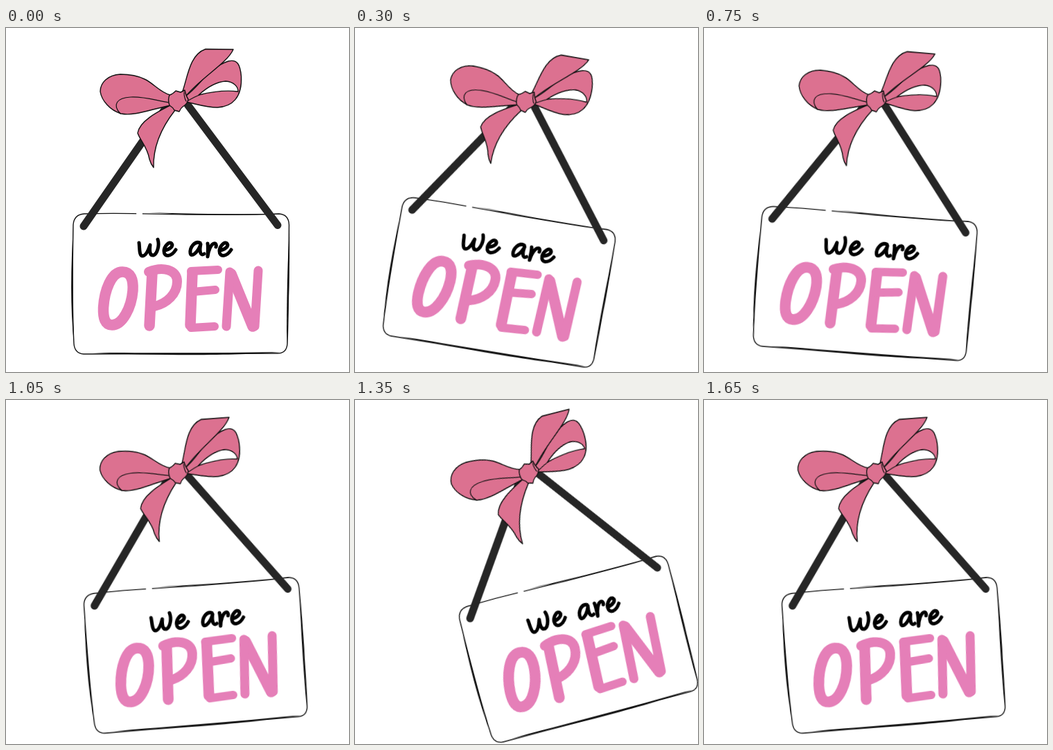
Write an HTML page that moves like this. It is 495 px wide and 498 px high and loops after 1.8 s.

```html
<!DOCTYPE html>
<html lang="en">
<head>
<meta charset="utf-8">
<title>We are open</title>
<style>
  html, body { margin: 0; width: 100%; height: 100%; overflow: hidden; background: #fff; }
  svg { display: block; width: 495px; height: 498px; }
  #swing { transform-box: view-box; transform-origin: 250px 97px; }
  path { stroke-linecap: round; stroke-linejoin: round; }
  .board { fill: #fff; stroke: #111; stroke-width: 1.4; }
  .gap { fill: none; stroke: #fff; stroke-width: 4; }
  .ink { fill: #111; }
  .cord { fill: none; stroke: #262626; stroke-width: 11; }
  .small { fill: none; stroke: #000; stroke-width: 5; }
  .big { fill: none; stroke: #e57fb8; stroke-width: 12; }
  .big .heavy { stroke-width: 15.5; }
  .bow { fill: #dc7190; stroke: #111; stroke-width: 1.4; }
  .hole { fill: #fff; stroke: #111; stroke-width: 1.3; }
  .fold { fill: none; stroke: #111; stroke-width: 1.2; }
</style>
</head>
<body>
<svg viewBox="0 0 495 498" role="img" aria-label="we are OPEN">
  <g id="swing">
    <!-- board with brushed edges -->
    <path class="board" d="M113 269 C180 267 210 270 260 270 S350 271 394 269 Q408 270 408.500 285 C408 340 408 400 406 457 Q405 471 392 471 C300 472 200 471 112 472 Q99 471 98 457 C95 400 96 340 97 285 Q98 270 113 269 Z"/>
    <path class="ink" d="M97 288 C94 340 92 400 98 456 C96 410 96 340 97 288 Z"/>
    <path class="ink" d="M125 470 C200 470 300 471 397 469 C330 475 210 474 125 470 Z"/>
    <path class="ink" d="M409 290 C410 340 408 400 405 460 C405 400 406 340 409 290 Z"/>
    <path class="ink" d="M205 267 C270 269 330 270 394 269 C330 272 260 271 205 267 Z"/>
    <path class="gap" d="M190 269 L195 269"/>

    <path class="cord" d="M112 287 L234 111 M392 285.500 L262 111"/>

    <!-- brush lettering -->
    <g class="small">
      <path d="M192 311 C193 318 192 330 197 330 C202 330 206 320 208 314 C207 322 207 330 213 329 C218 327 222 315 219 306"/>
      <path d="M228 322 C236 321 242 316 239 312 C236 308 228 316 228 323 C228 332 238 332 245 321"/>
      <path d="M280 311 C272 308 265 318 266 326 C267 333 277 325 281 313 C279 322 280 331 286 327"/>
      <path d="M291 312 C292 318 291 326 291 331 C292 322 296 313 300 312 C303 311 304 314 303 317"/>
      <path d="M308 322 C316 321 322 316 319 312 C316 308 308 316 308 323 C308 332 318 332 325 321"/>
    </g>
    <g class="big">
      <path class="heavy" d="M168 353 C180 353 184 364 183 380 C181 405 168 430 153 430 C143 430 140 420 140.500 405 C142 380 152 353 168 353 Z"/>
      <path class="heavy" d="M211 354 L207 431"/>
      <path d="M206 353 C225 345 247 349 247 367 C247 385 232 399 214 403" stroke-width="14"/>
      <path class="heavy" d="M269 354 L266 430"/>
      <path d="M267 352 L306 350 M269 382 L302 379 M267 434 L301 432"/>
      <path class="heavy" d="M325 356 L356 432"/>
      <path d="M323 353 L318 432 M364 351 L359 432" stroke-width="13"/>
    </g>

    <!-- bow -->
    <path class="bow" d="M239 111 C224 119 193 133 190 152 C193 162 204 172 207 190 Q209 197 213 202 C212 170 226 142 244 119 Z"/>
    <path class="bow" d="M237 97 C222 93 213 80 200 74 C190 69 176 67 165 67 C147 68 136 79 136 92 C138 105 150 119 166 124 C186 128 210 117 238 112 Z"/>
    <path class="fold" d="M165 124 C153 111 160 101 180 100 C200 99 216 105 236 108"/>
    <path class="bow" d="M260 98 C280 83 293 57 321 48 C334 45 338 53 339.500 70 C341 100 327 114 305 115 C288 115 275 110 260 107 Z"/>
    <path class="hole" d="M278 97 C290 86 304 78 317 77 C329 78 335 85 335 92 C318 90 298 92 278 97 Z"/>
    <path class="fold" d="M263 105 C270 101 274 99 279 97"/>
    <path class="bow" d="M254 94 C262 73 264 39 288 30.500 L328 31 C319 51 284 70 260 98 Z"/>
    <path class="bow" d="M236 97 Q240 96 245 91 L252 93 L258 90 Q260 99 263 103 Q262 110 255 114 Q252 116 250 121 L243 119 Q241 115 236 112 Q233 104 236 97 Z"/>
    <path class="fold" d="M257 93 Q257 101 260 106"/>
  </g>
</svg>
<script>
  // swing poses from right to left: degrees, x shift, y shift
  const poses = [
    [13.3, -0.4, 1], [9.4, -0.4, 1.5], [4.4, 0.5, 0.5], [0, 0, 0],
    [-4.7, -0.4, 0.3], [-9.4, 0, 0.4], [-14.9, 0.6, 0.2]
  ];
  const order = [3, 2, 1, 0, 1, 2, 3, 4, 5, 6, 5, 4];

  const frames = [...order, order[0]].map((p, i) => {
    const [deg, x, y] = poses[p];
    return {
      offset: i / order.length,
      transform: `translate(${x}px, ${y}px) rotate(${deg}deg)`,
      easing: "steps(1, end)"
    };
  });

  document.getElementById("swing").animate(frames, {
    duration: order.length * 150,
    iterations: Infinity
  });
</script>
</body>
</html>
```
